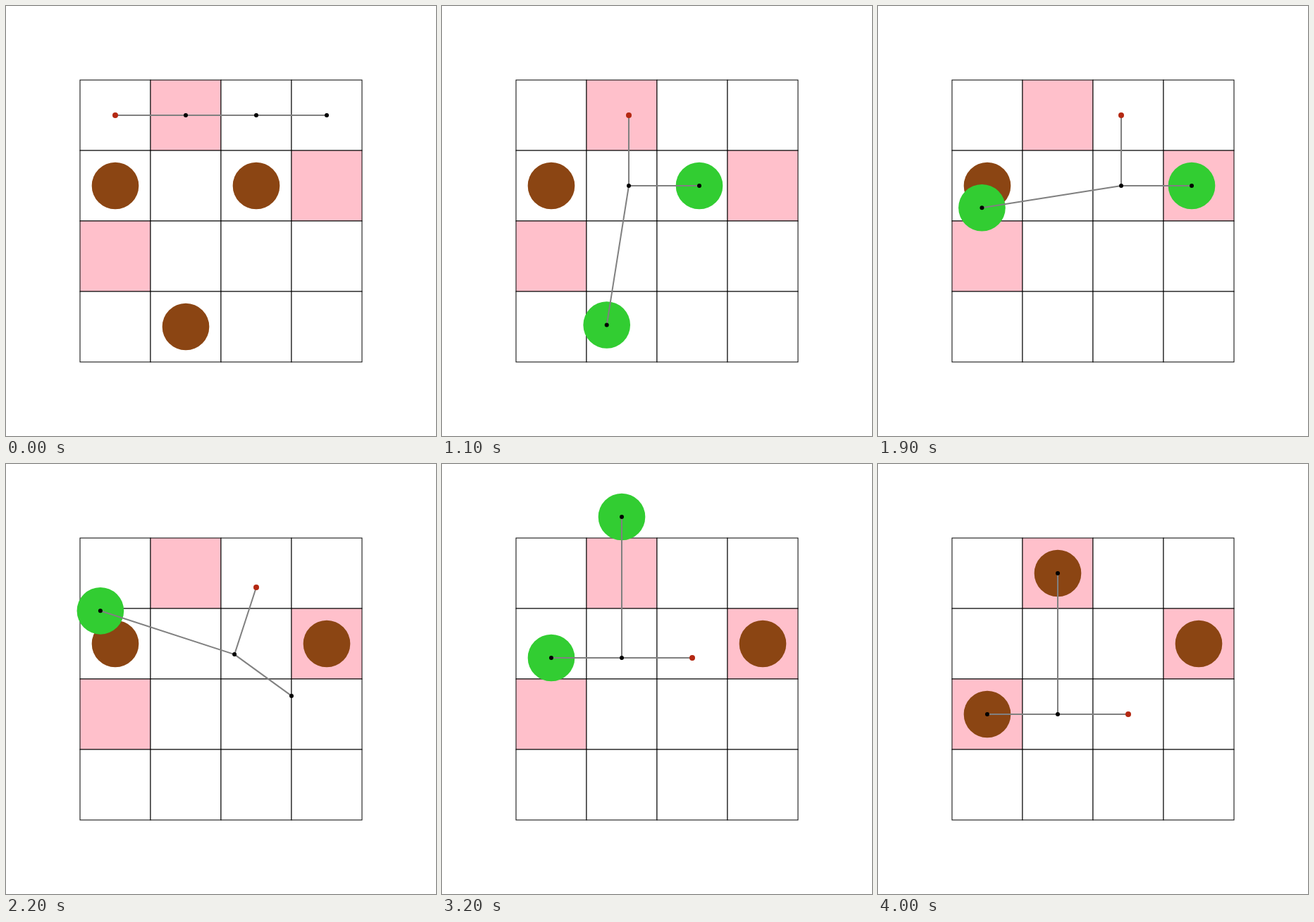
An HTML page with a canvas that plays this animation: 610x610 px, repeating every 7 s.

```html
<!DOCTYPE html>
<html lang="en">
<head>
<meta charset="utf-8">
<title>Robot arm on a grid</title>
<style>
  html, body { margin: 0; width: 100%; height: 100%; overflow: hidden; background: #fff; }
  canvas { display: block; }
</style>
</head>
<body>
<canvas id="stage" width="610" height="610"></canvas>
<script>
const ctx = document.getElementById('stage').getContext('2d');
const LOOP = 7000, STEP = 100, STEPS_PER_TURN = 10, TURNS = 4;
const CELL = 100, EDGE = 105, SIZE = 4;
const BROWN = '#8b4513', GREEN = '#32cd32', PINK = '#ffc0cb';
const goals = ['1,0', '3,1', '0,2'];

// Pose after each turn: root x, root y, then angles of elbow, short and long arm
const poses = [
  [155, 155, 0, 0, 0],
  [255, 155, 90, 0, 90],
  [355, 155, 90, 0, 180],
  [355, 255, 180, 180, 270],
  [355, 355, 180, 180, 270]
];

// Each disc is grabbed and dropped by one hand at whole turns
const discs = [
  { from: [155, 255], to: [155, 355], hand: 'short', grab: 3, drop: 4 },
  { from: [355, 255], to: [455, 255], hand: 'short', grab: 1, drop: 2 },
  { from: [255, 455], to: [255, 155], hand: 'long', grab: 1, drop: 4 }
];

function polar([x, y], deg, len) {
  const a = deg * Math.PI / 180;
  return [x + len * Math.cos(a), y + len * Math.sin(a)];
}

function armAt(turn) {
  const i = Math.min(Math.floor(turn), TURNS - 1);
  const f = turn - i;
  const [x, y, elbow, short, long] = poses[i].map((v, j) => v + (poses[i + 1][j] - v) * f);
  const root = [x, y];
  const mid = polar(root, elbow, CELL);
  return { root, mid, short: polar(mid, short, CELL), long: polar(mid, long, 2 * CELL) };
}

function circle([x, y], r, color) {
  ctx.fillStyle = color;
  ctx.beginPath();
  ctx.arc(x, y, r, 0, 2 * Math.PI);
  ctx.fill();
}

function line(a, b) {
  ctx.beginPath();
  ctx.moveTo(...a);
  ctx.lineTo(...b);
  ctx.stroke();
}

function drawGrid() {
  ctx.strokeStyle = '#000';
  ctx.lineWidth = 1;
  for (let row = 0; row < SIZE; row++) {
    for (let col = 0; col < SIZE; col++) {
      const box = [EDGE + col * CELL, EDGE + row * CELL, CELL, CELL];
      ctx.fillStyle = goals.includes(col + ',' + row) ? PINK : '#fff';
      ctx.fillRect(...box);
      ctx.strokeRect(...box);
    }
  }
}

function drawDiscs(turn, arm) {
  const held = d => turn >= d.grab && turn < d.drop;
  for (const d of discs) {
    if (!held(d)) circle(turn < d.grab ? d.from : d.to, CELL / 3, BROWN);
  }
  for (const d of discs) {
    if (held(d)) circle(arm[d.hand], CELL / 3, GREEN);
  }
}

function drawArm({ root, mid, short, long }) {
  ctx.strokeStyle = '#808080';
  ctx.lineWidth = 2;
  line(root, mid);
  line(mid, short);
  line(mid, long);
  for (const p of [mid, short, long]) circle(p, 3, '#000');
  circle(root, 4, '#b42812');
}

function draw(ms) {
  const step = Math.min(Math.floor(ms / STEP), TURNS * STEPS_PER_TURN);
  const turn = step / STEPS_PER_TURN;
  const arm = armAt(turn);
  ctx.fillStyle = '#fff';
  ctx.fillRect(0, 0, 610, 610);
  drawGrid();
  drawDiscs(turn, arm);
  drawArm(arm);
}

const start = performance.now();
function tick() {
  draw((performance.now() - start) % LOOP);
  requestAnimationFrame(tick);
}
tick();
</script>
</body>
</html>
```
